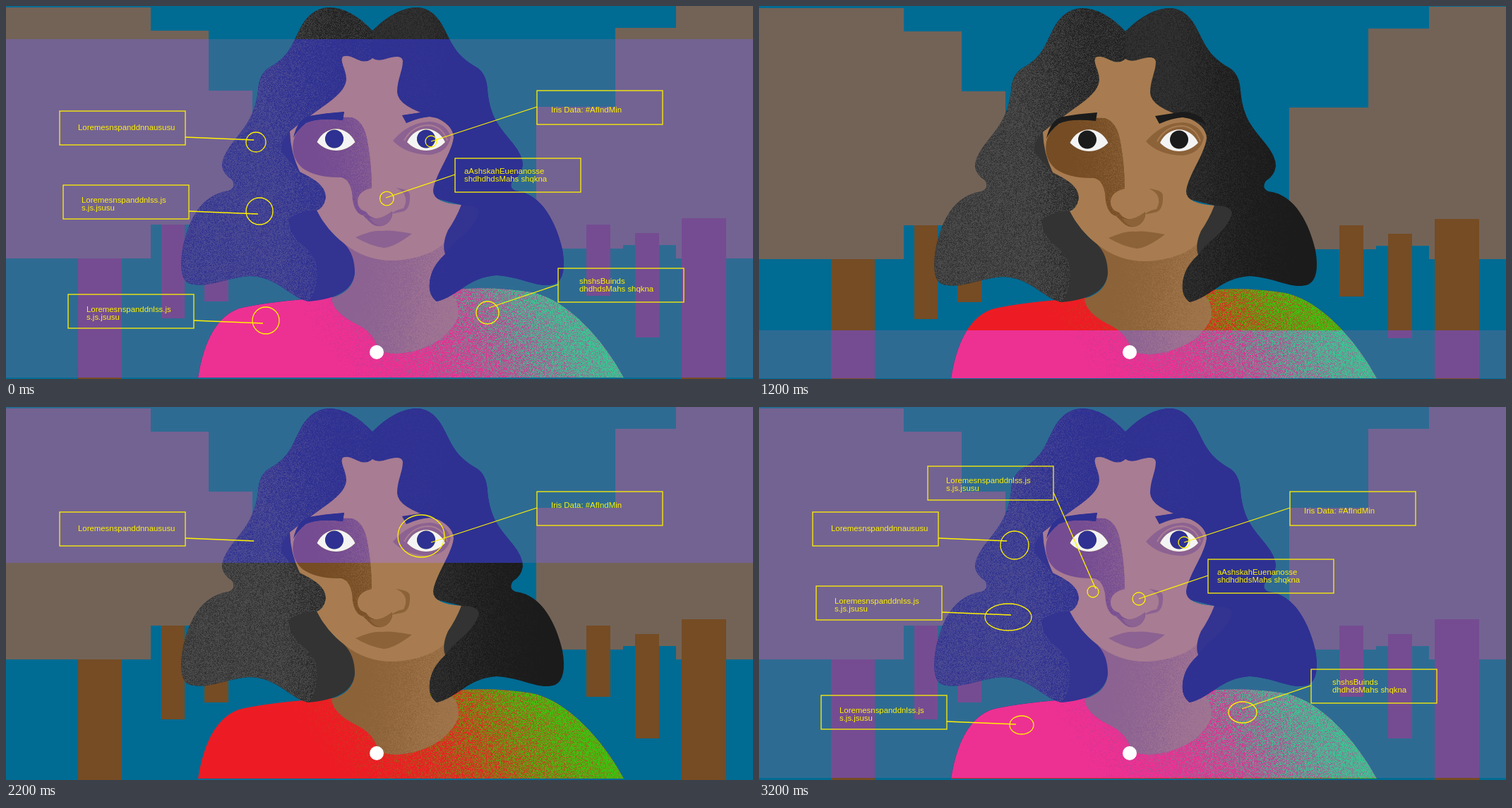
Animation of 1058x529 px, one loop 3.4 s. Source, as an HTML page with a canvas:

```html
<!DOCTYPE html>
<html lang="en">
<head>
<meta charset="utf-8">
<title>Face scan</title>
<style>
html, body { margin: 0; width: 100%; height: 100%; overflow: hidden; background: #006b93; }
#stage { position: absolute; left: 0; top: 0; width: 1058px; height: 529px; overflow: hidden; isolation: isolate; background: #006b93; }
#stage > * { position: absolute; left: 0; top: 0; }
#scan { width: 1058px; background: #2e3192; mix-blend-mode: lighten; }
#labels { fill: none; stroke: #fff200; stroke-width: 1.3; }
#labels text { fill: #fff200; stroke: none; font: 11.4px "Liberation Sans", Arial, sans-serif; }
</style>
</head>
<body>
<div id="stage">
  <canvas id="scene" width="1058" height="529"></canvas>
  <div id="scan"></div>
  <svg width="1058" height="529">
    <circle cx="525" cy="491" r="10" fill="#fff"/>
    <g id="labels"></g>
  </svg>
</div>
<script>
const $ = id => document.getElementById(id);
const clamp = (v, lo = 0, hi = 1) => Math.min(hi, Math.max(lo, v));
const lerp = (a, b, t) => a + (b - a) * t;
const INK = '#1b1b1b', GREY = '#333333', SKIN = '#a87c50', TAN = '#8c6239', BROWN = '#754c24', WALL = '#736357';
const ctx = $('scene').getContext('2d');

// --- Drawing helpers ---
let seed = 7;
function random() {
  seed = (seed + 0x6d2b79f5) | 0;
  let t = Math.imul(seed ^ (seed >>> 15), 1 | seed);
  t = (t + Math.imul(t ^ (t >>> 7), 61 | t)) ^ t;
  return ((t ^ (t >>> 14)) >>> 0) / 4294967296;
}

function fill(d, color) {
  ctx.fillStyle = color;
  ctx.fill(new Path2D(d));
}

function block(x1, y1, x2, y2, color) {
  ctx.fillStyle = color;
  ctx.fillRect(x1, y1, x2 - x1, y2 - y1);
}

// Shape in one colour with a noisy wash of another; density(x, y) is its mean strength.
function grain(d, base, speck, density) {
  const noise = document.createElement('canvas');
  const w = noise.width = 1058, h = noise.height = 529;
  const pen = noise.getContext('2d'), image = pen.createImageData(w, h);
  const rgb = [1, 3, 5].map(i => parseInt(speck.slice(i, i + 2), 16));
  for (let i = 0; i < w * h; i++) {
    const strength = clamp(density(i % w, Math.floor(i / w)) + (random() - .5) * .9);
    image.data.set([...rgb, strength * 255], i * 4);
  }
  pen.putImageData(image, 0, 0);
  fill(d, base);
  ctx.save();
  ctx.clip(new Path2D(d));
  ctx.drawImage(noise, 0, 0);
  ctx.restore();
}

// --- Background ---
function drawCity() {
  block(0, 2, 205, 358, WALL);
  block(205, 35, 287, 310, WALL);
  block(287, 120, 349, 310, WALL);
  block(949, -2, 1058, 358, WALL);
  block(863, 31, 949, 339, WALL);
  block(751, 143, 874, 344, WALL);
  block(102, 358, 164, 529, BROWN);
  block(220, 310, 253, 443, BROWN);
  block(281, 350, 315, 419, BROWN);
  block(822, 310, 856, 411, BROWN);
  block(891, 322, 925, 470, BROWN);
  block(957, 301, 1020, 529, BROWN);
}

// --- Portrait ---
function drawEye(x) {
  fill(`M${x - 27},193 C${x - 15},168 ${x + 15},168 ${x + 27},193 C${x + 12},209 ${x - 12},209 ${x - 27},193Z`, '#f4f4f4');
}

function drawIris(x) {
  ctx.fillStyle = INK;
  ctx.beginPath();
  ctx.arc(x, 188.5, 13, 0, Math.PI * 2);
  ctx.fill();
}

function drawPerson() {
  // shirt and neck
  grain('M272,527 Q285,445 330,429 Q370,419 460,413 L632,402 Q690,397 745,406 C800,418 850,480 875,527Z',
    '#ed1c24', '#35c80f', (x, y) => (x - 545 + (460 - y) * .6) / 300);
  grain('M465,320 L494,378 Q492,405 461,414 Q462,435 500,453 Q522,465 527,487 Q545,497 575,490 Q625,478 641,440 Q642,420 632,411 L600,410 600,390 640,320Z',
    TAN, '#a0754b', (x, y) => (x - 525 + (y - 420) * .2) / 105);

  // hair, left and right of the parting
  grain('M519,35 Q488,2 457,2 Q430,3 415,35 C402,62 398,72 375,86 Q358,95 357,120 C352,160 335,175 318,198 Q306,215 306,226 Q307,238 320,246 Q327,257 315,262 C275,268 258,305 250,345 Q244,385 258,393 C285,402 310,385 345,383 C385,384 400,412 428,419 L485,395 485,355 440,290 519,250Z',
    '#202020', '#4d4d4d', (x, y) => clamp(.74 - (x - 375 + (200 - y) * .1) / 230, .25, .76));
  grain('M519,35 Q552,2 583,2 Q607,3 622,35 C635,62 642,72 665,86 Q681,95 682,120 C686,160 700,172 718,195 Q732,212 732,226 Q730,240 718,247 Q711,258 722,262 C760,266 780,310 788,345 Q795,385 778,394 C755,402 735,385 695,382 C655,384 640,412 610,419 Q598,410 600,392 Q602,370 622,352 L632,318 645,282 519,250Z',
    INK, GREY, x => clamp(.9 - (x - 570) / 155, -1, .8));

  // face, and the flat inner side of the hair
  fill('M477,72 C472,78 482,90 482,104 C480,128 445,142 402,178 Q400,200 416,235 C440,247 453,256 453,272 Q450,287 440,290 Q454,318 479,337 Q510,362 550,361 Q598,358 621,336 Q638,305 645,282 Q605,279 605,262 C607,240 632,208 634,186 Q633,168 606,157 Q555,143 554,122 C554,104 562,92 562,78 C561,68 545,73 538,75 Q526,79 519,74 Q510,82 498,76 Q482,68 477,72Z', SKIN);
  fill('M402,178 Q387,194 390,207 L416,236 Q403,208 402,178Z', GREY);
  fill('M401,302 Q415,290 440,290 Q453,317 479,337 Q494,352 494,378 Q491,414 428,419 Q445,400 439,365 Q435,350 415,335 Q400,320 401,302Z', GREY);
  fill('M645,282 Q670,282 670,294 Q664,312 645,328 Q630,340 622,352 Q617,338 626,318 Q637,302 645,282Z', GREY);

  // shadow around the eye and down the nose
  grain('M407,192 Q412,168 440,160 Q470,157 490,158 Q507,163 512,192 Q518,225 518,258 Q500,262 498,275 Q497,288 510,292 Q515,301 528,302 Q540,297 547,291 Q548,305 535,311 Q524,315 515,306 L506,297 Q494,294 491,275 Q490,247 475,243 Q440,244 420,230 Q403,215 407,192Z',
    BROWN, TAN, (x, y) => (x - 465 - Math.max(0, y - 240) * .3) / 85);
  fill('M552,258 Q572,260 572,268 Q573,290 560,292 L545,295 Q554,288 563,287 Q569,276 564,267 Q560,261 552,258Z', TAN);
  fill('M514,300 Q528,305 546,292 Q548,305 535,311 Q524,315 514,300Z', TAN);
  fill('M495,328 Q520,317 533,319 Q545,317 575,323 Q550,342 535,343 Q515,340 495,328Z', TAN);

  // eyes and brows
  fill('M548,191 Q570,165 600,164 Q622,165 630,185 Q626,208 600,211 Q565,210 548,191Z', TAN);
  ctx.strokeStyle = SKIN;
  ctx.lineWidth = 2;
  ctx.stroke(new Path2D('M564,191 Q575,170 598,169 Q618,170 625,191'));
  drawEye(467.5);
  drawIris(465);
  drawEye(595);
  drawIris(595);
  fill('M407,187 Q413,160 430,156 Q450,152 479,150 L477,162 Q440,158 425,166 Q413,175 407,187Z', INK);
  fill('M561,155 L600,149 Q625,150 634,168 Q620,160 600,157 Q585,158 567,166Z', INK);
}

// --- Labels ---
// from: first stage shown; at: box corner; tip: end of the pointer; text: offset in the box;
// drift: extra text offset until it settles; ring: key poses [stage, x, y, rx, ry].
const WIDTH = 178, HEIGHT = 48, SETTLED = 6;
const lorem = ['Loremesnspanddnlss.js', 's.js.jsusu'];
const labels = [
  { from: 1, at: [752, 120], tip: [602, 192], text: [20, 31], drift: [0, -8], words: ['Iris Data: #AfIndMin'],
    ring: [[2, 588, 183, 33, 30], [4, 608, 194, 14, 14], [6, 602, 192, 8, 8]] },
  { from: 2, at: [76, 149], tip: [351, 190], text: [26, 27], words: ['Loremesnspanddnnaususu'],
    ring: [[3, 349, 181, 16, 16], [6, 354, 193, 14, 14], [7, 362, 196, 20, 20]] },
  { from: 3, at: [81, 254], tip: [357, 295], text: [26, 25], drift: [0, 3], words: lorem,
    ring: [[4, 354, 293, 23, 17], [6, 359, 291, 19, 19], [7, 353, 298, 33, 19]] },
  { from: 4, at: [636, 216], tip: [538, 272], text: [13, 22], drift: [7, 1], words: ['aAshskahEuenanosse', 'shdhdhdsMahs shqkna'],
    ring: [[4, 542, 275, 11.5, 11.5], [7, 538, 272, 9, 9]] },
  { from: 5, at: [88, 409], tip: [364, 450], text: [26, 25], words: lorem,
    ring: [[6, 368, 446, 19, 19], [7, 372, 451, 17, 13]] },
  { from: 6, at: [782, 372], tip: [684, 428], text: [30, 22], words: ['shshsBuinds', 'dhdhdsMahs shqkna'],
    ring: [[6, 682, 435, 16, 16], [7, 685, 433, 20, 15]] },
  { from: 7, at: [239, 84], tip: [477, 258], text: [26, 24], words: lorem,
    ring: [[7, 473, 262, 8, 8]] }
];

function ringMarkup(keys, stage) {
  if (stage < keys[0][0]) return '';
  const a = keys.findLast(k => k[0] <= stage);
  const b = keys.find(k => k[0] > stage) || a;
  const t = a === b ? 0 : (stage - a[0]) / (b[0] - a[0]);
  const [, x, y, rx, ry] = a.map((v, i) => lerp(v, b[i], t));
  return `<ellipse cx="${x}" cy="${y}" rx="${rx}" ry="${ry}"/>`;
}

function labelMarkup({ at: [x, y], tip, text, drift = [0, 0], words, ring }, stage) {
  const settled = stage >= SETTLED;
  const [dx, dy] = settled ? [0, 0] : drift;
  const gap = settled ? 11 : 10;
  const root = tip[0] < x ? [x, y + 23] : [x + WIDTH, y + 37];
  const lines = words.map((w, i) => `<text x="${x + text[0] + dx}" y="${y + text[1] + dy + i * gap}">${w}</text>`);
  return `<rect x="${x}" y="${y}" width="${WIDTH}" height="${HEIGHT}"/><path d="M${root} L${tip}"/>`
    + ringMarkup(ring, stage) + lines.join('');
}

// --- Timeline ---
// The scan leaves downwards while labels rewind, rests, then enters from the top while they build up.
const STEP = 200, LOOP = 3400, ENTER = 9;

function show(step) {
  const k = step - ENTER, entering = k >= 0;
  const drop = step >= 6 && step <= ENTER ? 1 : 0;
  const floor = 527 + drop;
  const top = entering ? 0 : Math.min(floor, 47 + 58.8 * step + 1.67 * step * step);
  const bottom = entering ? Math.min(floor, 76 + 61 * k + 11.5 * Math.min(k, 2)) : floor;
  $('scan').style.top = Math.round(top) + 'px';
  $('scan').style.height = Math.round(bottom) - Math.round(top) + 'px';
  $('scene').style.top = drop + 'px';
  const stage = entering ? k : Math.max(0, 6 - step);
  $('labels').innerHTML = labels.filter(l => stage >= l.from).map(l => labelMarkup(l, stage)).join('');
}

drawCity();
drawPerson();
const start = performance.now();
let shown = -1;
function tick() {
  const step = Math.floor(((performance.now() - start) % LOOP) / STEP);
  if (step !== shown) show(shown = step);
  requestAnimationFrame(tick);
}
tick();
</script>
</body>
</html>
```
